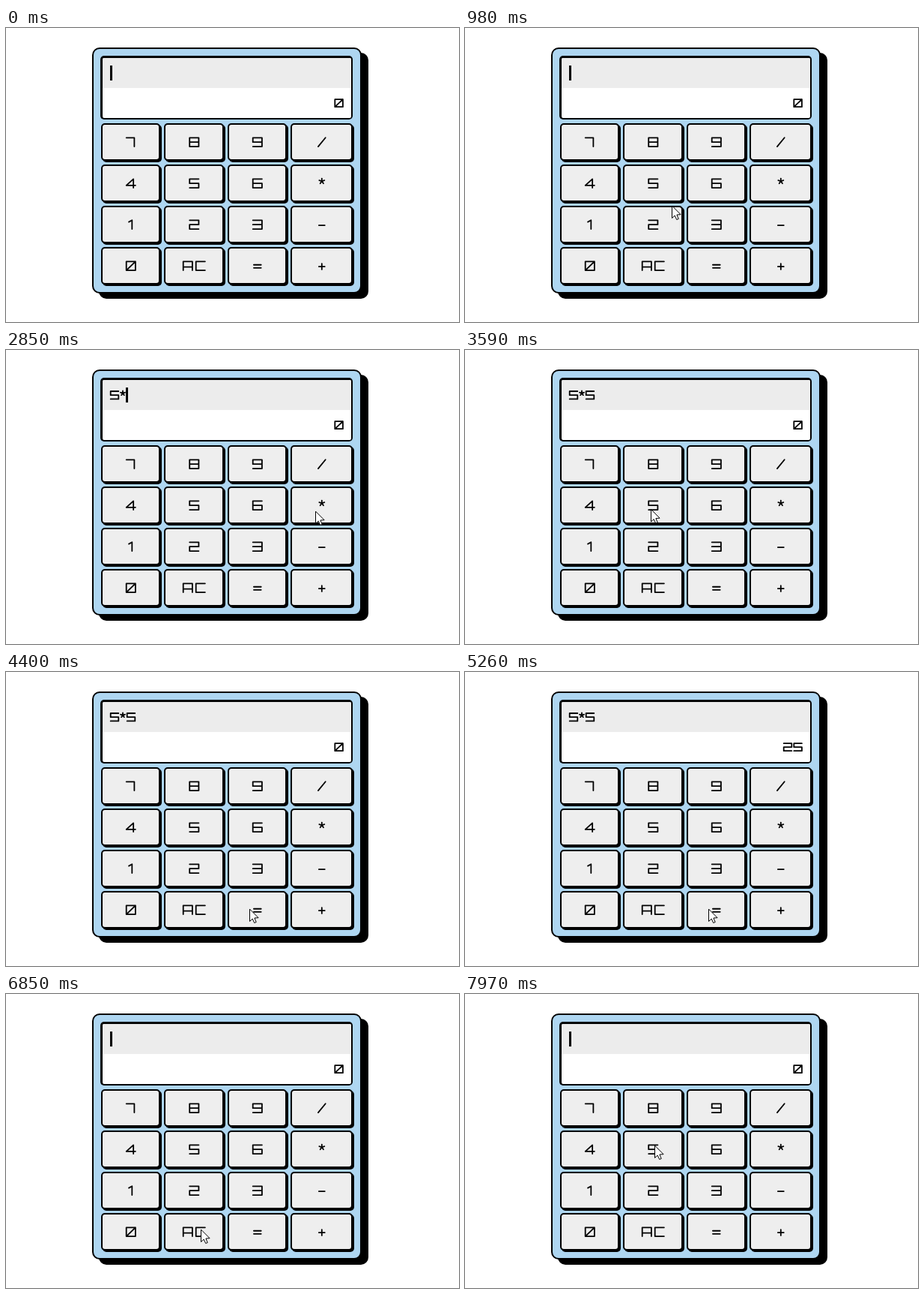
An HTML page with a canvas for the animation above (8 s loop, 605 by 392 pixels).

```html
<!DOCTYPE html>
<html lang="en">
<head>
<meta charset="utf-8">
<title>Calculator</title>
<style>
html, body { margin: 0; width: 100%; height: 100%; overflow: hidden; background: #fff; }
canvas { display: block; }
</style>
</head>
<body>
<canvas id="stage" width="605" height="392" role="img" aria-label="Calculator working out 5*5"></canvas>
<script>
const ctx = document.getElementById('stage').getContext('2d');
const LOOP = 8000;

// Points of the stroke font: a 3x3 grid (a to i) and a few extras, from -2 to 2
const points = {
  j: [-2, 0.5], k: [2, 0.5],
  l: [1.1, 2], m: [1.1, -2], n: [-2, 0.9], o: [2, 0.9],
  p: [-0.9, -1.2], q: [0.5, -2], r: [0.5, 2],
  s: [-1.6, 2], t: [1.6, -2],
  u: [-1.6, -0.5], v: [1.6, -0.5], w: [-1.6, 0.9], x: [1.6, 0.9],
  y: [-1.3, 0.3], z: [1.3, 0.3], Y: [0, -1], Z: [0, 1.6],
  A: [1.5, -2], B: [1.5, 2]
};
[...'abcdefghi'].forEach((c, i) => {
  points[c] = [(i % 3 - 1) * 2, (Math.floor(i / 3) - 1) * 2];
});
const glyphs = {
  0: 'aciga gc', 1: 'pqr', 2: 'acfdgi', 3: 'acig df', 4: 'lmno',
  5: 'cadfig', 6: 'cagifd', 7: 'aAB', 8: 'aciga df', 9: 'gicadf',
  A: 'gaci jk', C: 'cagi', '/': 'st', '=': 'uv wx', '-': 'yz', '+': 'yz YZ'
};

const columns = [[127, 79], [211, 80], [296, 79], [380, 83]];
const keys = [['7', '8', '9', '/'], ['4', '5', '6', '*'], ['1', '2', '3', '-'], ['0', 'AC', '=', '+']];

// Pointer moves: start, end, x, y
const enter = { at: 310, x: 468, y: 328 };
const moves = [
  [310, 580, 288, 251], [780, 980, 276, 237], [1180, 1450, 248, 211],
  [2150, 2580, 413, 215], [2960, 3320, 248, 212.5], [3750, 4400, 325, 316],
  [5760, 6050, 342, 317], [6150, 6390, 260, 314],
  [7090, 7310, 253, 257], [7620, 7960, 253, 202]
];
const clicks = [
  { from: 1845, to: 2036, key: '5', text: '5', result: '0' },
  { from: 2705, to: 2845, key: '*', text: '5*', result: '0' },
  { from: 3455, to: 3585, key: '5', text: '5*5', result: '0' },
  { from: 4925, to: 5055, key: '=', text: '5*5', result: '25' },
  { from: 6780, to: 6845, key: 'AC', text: '', result: '0' }
];
const textCentres = [145, 156, 167];
const caretStops = [139, 152, 160, 174];

function box(x, y, w, h, r, color) {
  ctx.fillStyle = color;
  ctx.beginPath();
  ctx.roundRect(x, y, w, h, r);
  ctx.fill();
}

function glyph(ch, cx, cy, w, h) {
  const sx = w / 4, sy = h / 4;
  ctx.beginPath();
  if (ch === '*') {
    for (let i = 0; i < 5; i++) {
      const a = -Math.PI / 2 + i * Math.PI * 0.4;
      ctx.moveTo(cx, cy - sy);
      ctx.lineTo(cx + Math.cos(a) * sx * 1.2, cy - sy + Math.sin(a) * sx * 1.2);
    }
  } else {
    for (const line of glyphs[ch].split(' ')) {
      [...line].forEach((id, i) => {
        const [x, y] = points[id];
        ctx[i ? 'lineTo' : 'moveTo'](cx + x * sx, cy + y * sy);
      });
    }
  }
  ctx.stroke();
}

function drawKeys(pressed) {
  keys.forEach((row, r) => row.forEach((label, c) => {
    const [x, w] = columns[c], y = 127 + r * 55, h = 50;
    box(x + 2, y + 2, w, h, 5, '#000');
    box(x, y, w, h, 5, '#000');
    box(x + 2, y + 2, w - 4, h - 4, 3, label === pressed ? '#c0c0bf' : '#eee');
    const mid = x + w / 2 + 0.3;
    [...label].forEach((ch, i) => {
      glyph(ch, mid + (i - (label.length - 1) / 2) * 17, y + 25.2, 12.2, 11.8);
    });
  }));
}

function drawDisplay(text, result, caretOn) {
  box(126, 37, 337, 85, 5, '#000');
  box(129, 40, 332, 80, 2, '#fff');
  box(129, 40, 332, 40, [2, 2, 0, 0], '#ececec');
  [...text].forEach((ch, i) => glyph(ch, textCentres[i], 60.2, 10.6, 10.4));
  [...result].forEach((ch, i) => {
    glyph(ch, 444.6 - (result.length - 1 - i) * 13.6, 100.2, 10.6, 10);
  });
  if (caretOn) box(caretStops[text.length], 50, 3, 20, 0, '#000');
}

function pointerAt(t) {
  let { x, y } = enter;
  for (const [from, to, nx, ny] of moves) {
    if (t < from) break;
    const p = Math.min(1, (t - from) / (to - from));
    const e = p * p * (3 - 2 * p);
    x += (nx - x) * e;
    y += (ny - y) * e;
  }
  return [x, y];
}

function drawPointer(x, y, ring) {
  if (ring) {
    ctx.fillStyle = 'rgba(232, 230, 50, 0.72)';
    ctx.beginPath();
    ctx.arc(x, y - 1, 13, 0, Math.PI * 2);
    ctx.fill();
  }
  ctx.save();
  ctx.translate(x + 0.5, y + 0.5);
  ctx.beginPath();
  ctx.moveTo(0, 0);
  ctx.lineTo(0, 16);
  ctx.lineTo(3.7, 12.6);
  ctx.lineTo(6.2, 18);
  ctx.lineTo(8.7, 17);
  ctx.lineTo(6.4, 11.5);
  ctx.lineTo(11.2, 11.2);
  ctx.closePath();
  ctx.fillStyle = '#fff';
  ctx.fill();
  ctx.lineWidth = 1;
  ctx.lineJoin = 'miter';
  ctx.stroke();
  ctx.restore();
}

function draw(t) {
  const done = clicks.filter(c => t >= c.to).pop() || { text: '', result: '0' };
  const click = clicks.find(c => t >= c.from && t < c.to);
  const caretOn = Math.floor((t + 250) / 500) % 2 === 0;

  ctx.fillStyle = '#fff';
  ctx.fillRect(0, 0, 605, 392);
  ctx.strokeStyle = '#000';
  ctx.lineWidth = 1.8;
  ctx.lineJoin = ctx.lineCap = 'round';

  box(124, 33, 360, 328, 10, '#000');
  box(115, 26, 360, 328, 10, '#000');
  box(117, 28, 356, 324, 8, '#aed6f1');
  drawDisplay(done.text, done.result, caretOn);
  drawKeys(click && t >= click.from + 45 ? click.key : null);
  if (t >= enter.at) drawPointer(...pointerAt(t), click);
}

const start = performance.now();
function tick() {
  draw((performance.now() - start) % LOOP);
  requestAnimationFrame(tick);
}
tick();
</script>
</body>
</html>
```
